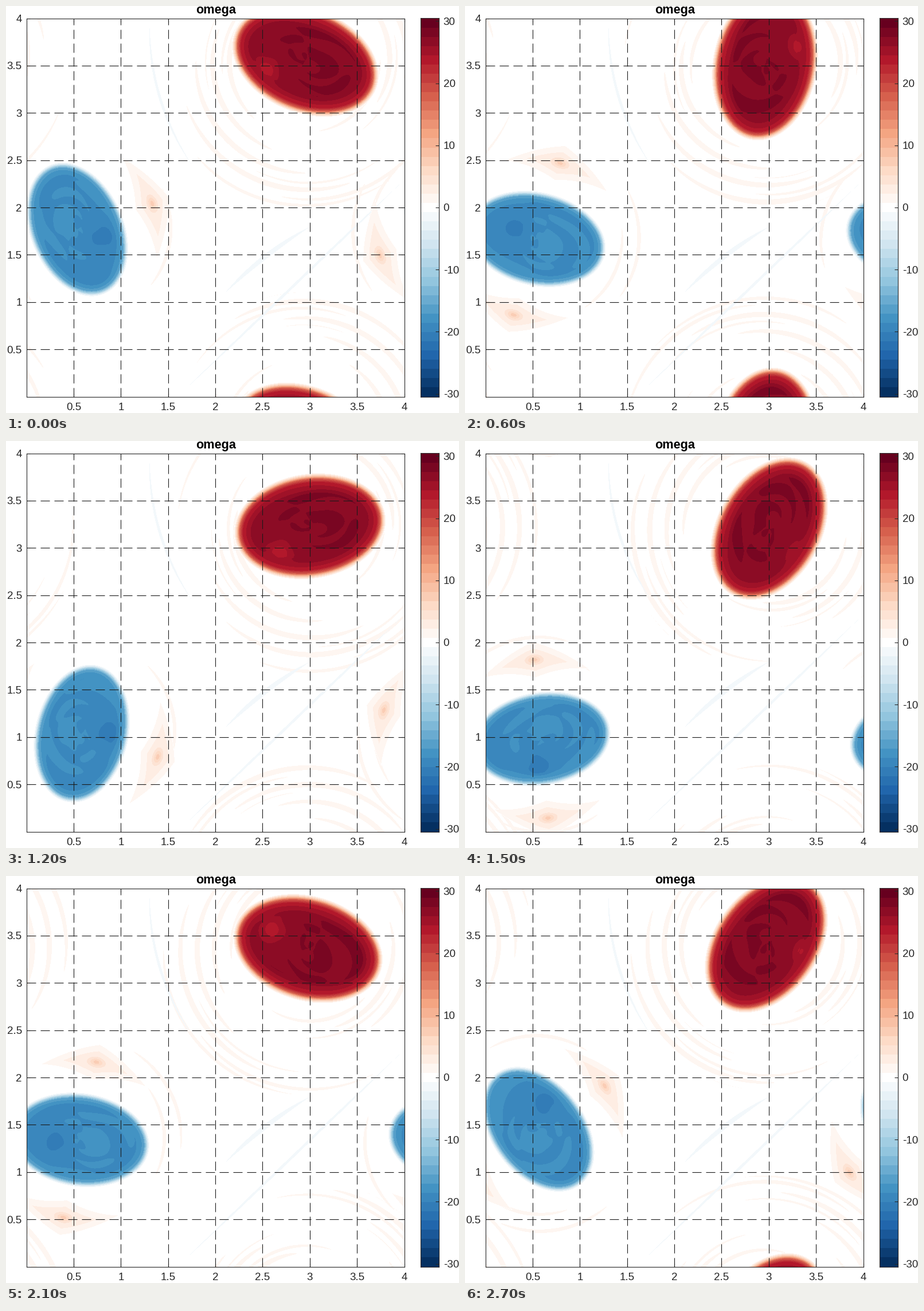
Recreate the animation shown at these times as a matplotlib script. Size 790x709 px, loop 3000 ms.

```python
import numpy as np
import matplotlib.pyplot as plt
from matplotlib.animation import FuncAnimation
from matplotlib.colors import LinearSegmentedColormap

W, H, DPI = 790, 709, 100
SIZE, PEAK, FRAMES = 659, 30.5, 10
SCALE = SIZE / 4
INK = "#262626"
plt.rcParams["font.family"] = "Liberation Sans"

CMAP = LinearSegmentedColormap.from_list("vorticity", [
    "#053061", "#2166ac", "#4393c3", "#92c5de", "#d1e5f0", "#ffffff",
    "#fddbc7", "#f4a582", "#d6604d", "#b2182b", "#67001f"], N=41)

# Key poses of the motion: shared vertical drift and the turn of each vortex
KEY_TIMES = [0, 2, 3, 5, 6, 7, 9]
DRIFT = [0, -.045, -.30, -.35, -.235, -.19, -.14]
RED_TURN = [158, 260, 316, 421, 457, 524, 594]
BLUE_TURN = [113, -13, -35, -171, -139, -188, -233]

axis = (np.arange(SIZE) + .5) / SCALE
X, Y = np.meshgrid(axis, axis)


def at(k, values):
    return np.interp(k, KEY_TIMES, values)


def polar(x, y, radius, angle):
    return x + radius * np.cos(angle), y + radius * np.sin(angle)


def offset(x, y):
    """Displacement from a point on the periodic 4 x 4 domain."""
    return (X - x + 2) % 4 - 2, (Y - y + 2) % 4 - 2


def rotated(x, y, angle):
    dx, dy = offset(x, y)
    c, s = np.cos(angle), np.sin(angle)
    return dx * c + dy * s, dy * c - dx * s


def bump(x, y, radius):
    dx, dy = offset(x, y)
    return np.exp(-(dx**2 + dy**2) / radius**2)


def ellipse(x, y, a, b, turn):
    """Depth inside the rim in pixels, and elliptic radius."""
    p, q = rotated(x, y, turn)
    rho = np.hypot(p / a, q / b) + 1e-6
    slope = np.hypot(p / a**2, q / b**2) / rho + 1e-6
    return (1 - rho) / slope * SCALE, rho


def swirl(x, y, rho, phase):
    dx, dy = offset(x, y)
    angle = np.arctan2(dy, dx) - phase
    a = np.sin(9 * rho + 2 * angle + 1.5 * np.sin(angle + 5 * rho))
    b = np.sin(19 * rho - angle + 2 * np.cos(2 * angle - 4 * rho))
    return .55 * a + .45 * b


def satellite(x, y, angle):
    """Bent teardrop with its long side across the given direction."""
    across, along = rotated(x, y, angle)
    across = across + .45 * along**2
    shape = 1 - np.abs(along) / .6 - np.abs(across) / .2
    value = np.clip(shape * 9, 0, 1.4) + np.clip(shape * 2, 0, 1.4)
    return value + 4.5 * np.exp(-(along / .08)**2 - (across / .045)**2)


def streak(x0, y0, x1, y1, width, bend=0):
    """Thin tapered filament between two points."""
    length = np.hypot(x1 - x0, y1 - y0)
    ux, uy = (x1 - x0) / length, (y1 - y0) / length
    t = ((X - x0) * ux + (Y - y0) * uy) / length
    taper = np.clip(4 * t * (1 - t), 0, 1)
    side = (Y - y0) * ux - (X - x0) * uy - bend * taper
    return np.abs(side) < width * taper


def rings(x, y, phase, inner, outer, cut):
    """Faint wound-up filaments around a vortex."""
    dx, dy = offset(x, y)
    r, angle = np.hypot(dx, dy), np.arctan2(dy, dx) - phase
    wave = (np.sin(33 * r + angle) + np.sin(71 * r - 2 * angle + 1)
            + 1.1 * np.sin(2 * angle - 5 * r))
    return (wave > cut) & (r > inner) & (r < outer)


def field(k):
    drift = at(k, DRIFT)
    red = 2.95 - .15 * drift, 3.557 + drift
    blue = .535 - .15 * drift, 1.771 + 2.25 * drift
    red_turn, blue_turn = np.radians([at(k, RED_TURN), at(k, BLUE_TURN)])
    red_phase = np.radians(193 + 97 * k)
    blue_phase = blue_turn - np.radians(130 + 31 * k)

    f = np.zeros_like(X)
    f[rings(*red, red_phase, .75, 1.55, 1.25)] = 1.1
    f[rings(*blue, blue_phase, .85, 1.15, 2.1)] = 1.1
    f[streak(1.7, .1, 3.95, 2.25, .014)] = -1.1
    f[streak(2.1, 1.1, 3.0, 1.8, .025, .04)] = -1.1
    f[streak(1.3, 3.95, 1.75, 2.45, .014, -.12)] = -1.1

    # The satellites stay on the short axis of the blue vortex
    for side in (-1, 1):
        angle = blue_turn + side * np.pi / 2 - .07
        s = satellite(*polar(*blue, .84, angle), angle)
        f = np.where(s > .5, s, f)

    depth, rho = ellipse(*blue, .742, .498, blue_turn)
    core = np.interp(depth, [0, 3, 6, 10, 16, 24],
                     [0, -4, -10, -16, -17.8, -18.8])
    core += np.clip((depth - 12) / 12, 0, 1) * (
        .7 * swirl(*blue, rho, blue_phase)
        - 2.2 * bump(*polar(*blue, .27, blue_phase), .11)
        + 1.2 * bump(*polar(*blue, -.14, blue_phase), .13))
    f = np.where(depth > 0, core, f)

    depth, rho = ellipse(*red, .81, .557, red_turn)
    core = np.interp(depth, [0, 2, 6, 10, 16, 25, 36],
                     [0, 3, 9, 18, 23.5, 25.2, 27.4])
    core += np.clip((depth - 24) / 14, 0, 1) * (
        .75 * swirl(*red, rho, red_phase)
        - 3.5 * bump(*polar(*red, .42, red_phase), .13))
    return np.where(depth > 0, core, f)


fig = plt.figure(figsize=(W / DPI, H / DPI), dpi=DPI, facecolor="white")


def panel(x, y, w, h):
    ax = fig.add_axes([x / W, 1 - (y + h) / H, w / W, h / H])
    for spine in ax.spines.values():
        spine.set(linewidth=.8, color=INK)
    ax.tick_params(direction="in", length=4.5, width=.8, pad=5.5,
                   labelsize=13.5, labelcolor=INK, color=INK)
    return ax


def show(ax, data, extent):
    return ax.imshow(data, cmap=CMAP, vmin=-PEAK, vmax=PEAK, origin="lower",
                     extent=extent, aspect="auto", interpolation="nearest")


ax = panel(35.6, 21.6, SIZE, SIZE)
image = show(ax, field(0), (0, 4, 0, 4))
ticks = np.arange(1, 9) / 2
labels = [f"{t:g}" for t in ticks]
ax.set_xticks(ticks, labels)
ax.set_yticks(ticks, labels)
ax.tick_params(top=True, right=True)
ax.tick_params(axis="x", pad=7.5)
for t in ticks[:-1]:
    for line in (ax.axhline, ax.axvline):
        line(t, color="#1a1a1a", lw=.8, dashes=(14.4, 7.2))
fig.text(366 / W, 1 - 13.5 / H, "omega", size=15.6, weight="bold",
         ha="center", va="baseline")

bar = panel(723, 21, 32, 660)
show(bar, np.linspace(-PEAK, PEAK, 660)[:, None], (0, 1, -PEAK, PEAK))
levels = range(-30, 31, 10)
bar.set_xticks([])
bar.set_yticks(levels, [str(v) for v in levels])
bar.yaxis.tick_right()


def update(k):
    image.set_data(field(k))
    return image,


animation = FuncAnimation(fig, update, frames=FRAMES, interval=300,
                          repeat=True, repeat_delay=0)
plt.show()
```
